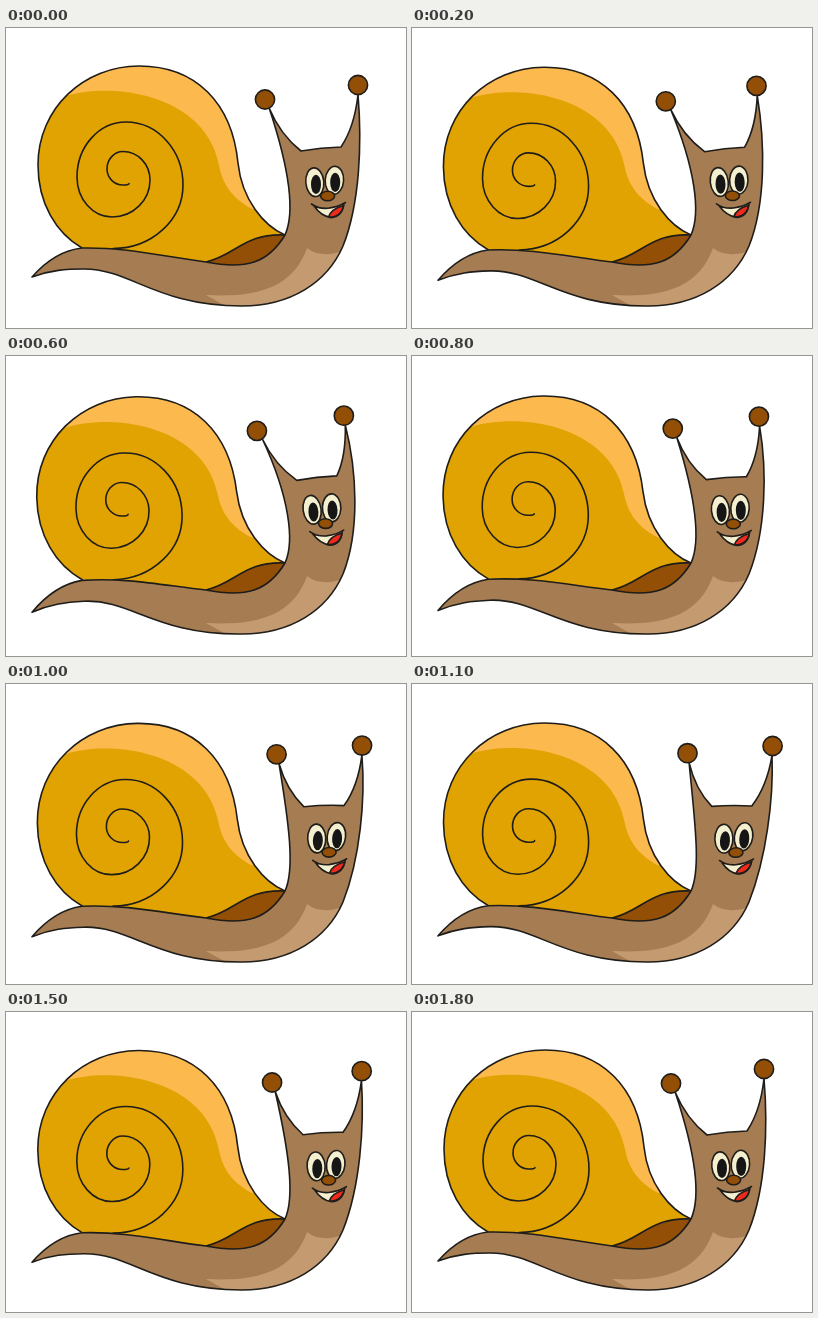
Recreate the animation shown at these times as an HTML page. Size 400x300 px, loop 2000 ms.

```html
<!DOCTYPE html>
<html lang="en">
<head>
<meta charset="utf-8">
<title>Snail</title>
<style>
html, body { margin: 0; width: 100%; height: 100%; overflow: hidden; background: #fff; }
svg { display: block; width: 100vw; height: 100vh; }
.line { fill: none; }
.ink { stroke: #1f1d1a; stroke-width: 1.6; stroke-linejoin: round; stroke-linecap: round; }
.brown { fill: #924f05; }
.cream { fill: #f4efce; }
.pupil { fill: #161616; }
</style>
</head>
<body>
<svg viewBox="0 0 400 300">
  <defs>
    <path id="shellShape" d="M76 220C50 205 32 175 32 137C32 80 78 38 133 38C190 38 226 75 232 135C236 172 258 198 279 207"/>
    <clipPath id="shellClip"><use href="#shellShape"/></clipPath>
    <path id="bodyShape"/>
    <clipPath id="bodyClip"><use href="#bodyShape"/></clipPath>
  </defs>
  <g id="shell">
    <use href="#shellShape" fill="#e0a302"/>
    <path fill="#e0a302" d="M76 219L279 206L250 231L200 237L120 231Z"/>
    <path fill="#fcb94e" clip-path="url(#shellClip)" d="M60 68C110 53 200 68 213 137C217 160 230 172 246 181L290 180V20H50Z"/>
    <use href="#shellShape" class="line ink"/>
    <path id="spiral" class="line ink"/>
  </g>
  <path class="brown ink" d="M200 234C230 227 238 205 279 207L274 225L248 242L225 243Z"/>
  <use href="#bodyShape" fill="#a67c52"/>
  <path fill="#c49b71" clip-path="url(#bodyClip)" d="M200 267C250 270 287 260 301 220Q314 230 334 224L350 240L300 300L232 285Z"/>
  <use href="#bodyShape" class="line ink"/>
  <circle id="left" class="brown ink" r="9.6"/>
  <circle id="right" class="brown ink" r="9.6"/>
  <g id="face">
    <ellipse class="cream ink" cx="308.8" cy="154.2" rx="9" ry="14.4" transform="rotate(-5 308.8 154.2)"/>
    <ellipse class="cream ink" cx="328.4" cy="152.3" rx="9.2" ry="14" transform="rotate(4 328.4 152.3)"/>
    <ellipse class="pupil" cx="310" cy="156.4" rx="5" ry="9.6"/>
    <ellipse class="pupil" cx="329.2" cy="154.4" rx="5" ry="9.6"/>
    <ellipse class="brown ink" cx="321.6" cy="168" rx="7" ry="4.8"/>
    <path class="cream" d="M308 178Q322 184 338 176Q336 189 325 189.6Q315 188 308 178Z"/>
    <path class="ink" fill="#ee2a1c" stroke-width="1" d="M322.5 189Q325 181 337.5 177.5Q336 189 322.5 189Z"/>
    <path class="line ink" d="M305.5 176Q312 181 322 180.3Q332 179 339.5 174.5M308 178Q315 188 325 189.6Q336 189 338 176"/>
  </g>
</svg>
<script>
const $ = id => document.getElementById(id);

// Quarter ellipses joining the outermost points of each turn
function spiral([x, y], turns) {
  let d = `M${x} ${y}`;
  for (const [u, v] of turns) {
    d += `A${Math.abs(u - x)} ${Math.abs(v - y)} 0 0 1 ${u} ${v}`;
    [x, y] = [u, v];
  }
  return d;
}
$('spiral').setAttribute('d', spiral([123, 155.5],
  [[117, 157], [101, 141], [117, 123.5], [144, 152], [106, 189], [71, 149], [120, 94], [177, 157], [107, 220.5]]));

// Resting, leaning back, leaning forward; linear motion between them
const rest = { at: 0, sag: 0, lean: 0, lx: 259, ly: 71.5, rx: 352, ry: 57, dropL: 0, dropR: 0 };
const back = { at: 500, sag: 1.08, lean: -6, lx: 246, ly: 76, rx: 333.3, ry: 59.2, dropL: 1.8, dropR: .5 };
const forth = { at: 1100, sag: .38, lean: 4.8, lx: 275.5, ly: 69.2, rx: 360.6, ry: 62, dropL: -.6, dropR: 3 };
const poses = [rest, back, forth, { ...rest, at: 1800 }];

function pose(t) {
  const i = poses.findIndex((p, k) => k > 0 && p.at >= t);
  const a = poses[i - 1], b = poses[i], f = (t - a.at) / (b.at - a.at);
  const out = {};
  for (const k in a) out[k] = a[k] + (b[k] - a[k]) * f;
  return out;
}

// Point where a stalk leaves its knob
function tip(x, y, tx, ty) {
  const k = 9.5 / Math.hypot(tx - x, ty - y);
  return [x + (tx - x) * k, y + (ty - y) * k];
}
// Quadratic from a to b, pushed sideways from the middle
const bend = (a, b, dx, dy) => `Q${(a[0] + b[0]) / 2 + dx} ${(a[1] + b[1]) / 2 + dy} ${b}`;

function place(id, x, y) {
  $(id).setAttribute('cx', x);
  $(id).setAttribute('cy', y);
}

function draw(t) {
  const { sag, lean, lx, ly, rx, ry, dropL, dropR } = pose(t);
  const tail = (x, y) => `${x} ${y + 7.5 * sag * ((200 - x) / 174) ** 1.5} `;
  const lt = tip(lx, ly, 285, 125);
  const rt = tip(rx, ry, 352 + lean, 125);
  const a = [295 + lean, 123 + dropL];
  const b = [335 + lean, 119 + dropR];
  $('bodyShape').setAttribute('d',
    `M${tail(26, 249)}C${tail(40, 233)}${tail(58, 222)}${tail(76, 220)}` +
    `C${tail(120, 219)}${tail(160, 229)}200 234` +
    `C240 242 262 235 279 207C289 185 283 140 ${lt}` +
    bend(lt, a, -5, 5) + bend(a, b, 0, -1.5) + bend(b, rt, 5, 6) +
    `C${356 + 1.2 * lean} 115 354 175 337 218C321 255 284 278 236 278` +
    `C${tail(150, 278)}${tail(125, 241)}${tail(78, 241)}` +
    `C${tail(60, 241)}${tail(45, 242)}${tail(26, 249)}Z`);
  place('left', lx, ly);
  place('right', rx, ry);
  $('shell').setAttribute('transform', `rotate(${-1.1 * sag} 279 207)`);
  $('face').setAttribute('transform', `matrix(1 0 ${-lean / 95} 1 ${lean * 215 / 95} ${.1 * lean})`);
}

const start = performance.now();
function tick() {
  const t = (performance.now() - start) % 2000;
  draw(Math.min(1800, Math.floor(t / 100) * 100));
  requestAnimationFrame(tick);
}
tick();
</script>
</body>
</html>
```
